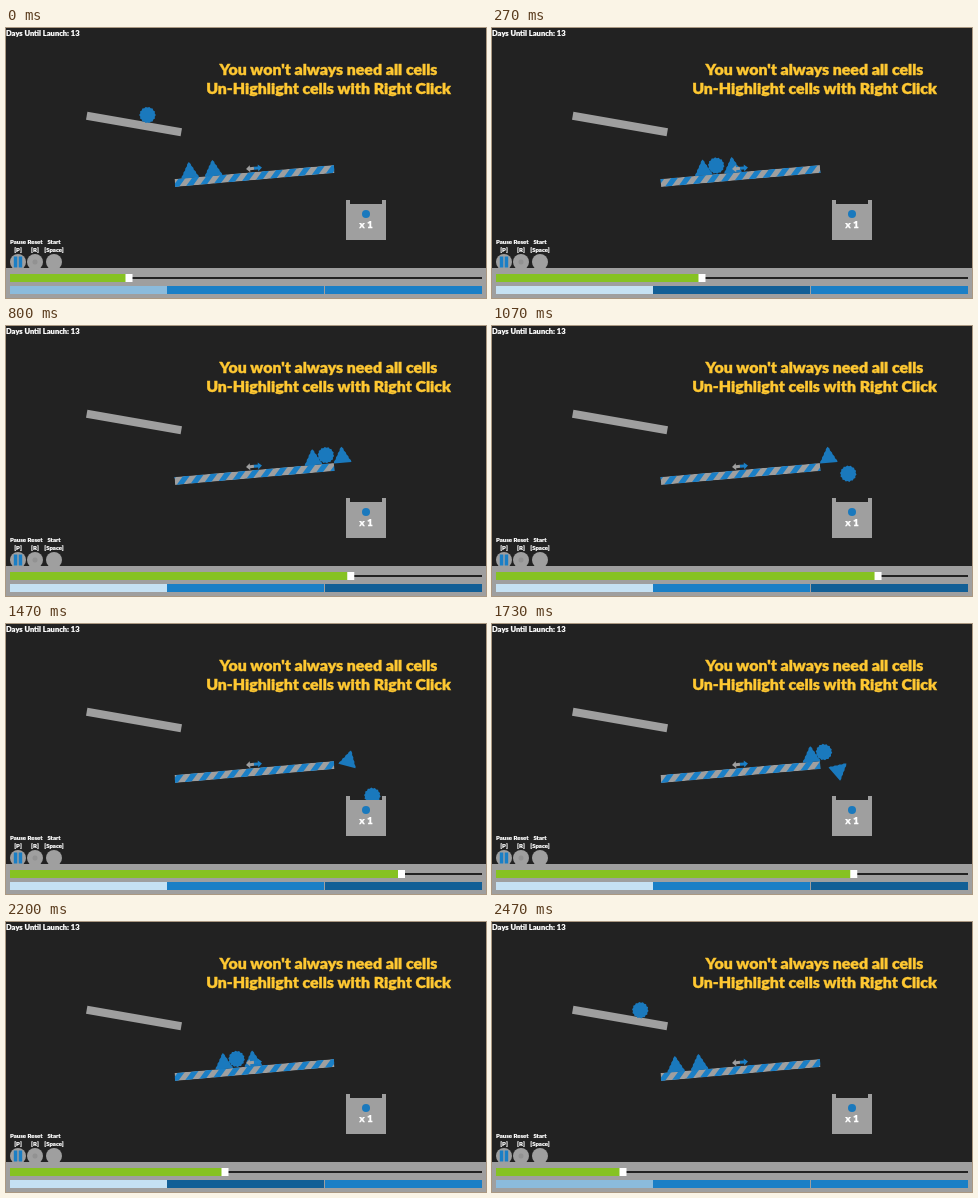
Animation, 480 px wide and 270 px high, one loop 2540 ms. Source, as an HTML page with a canvas:

```html
<!DOCTYPE html>
<html lang="en">
<head>
<meta charset="utf-8">
<title>Conveyor puzzle</title>
<style>
  html, body { margin: 0; width: 100%; height: 100%; overflow: hidden; background: #222; }
  canvas { display: block; width: 100%; height: 100%; }
</style>
</head>
<body>
<canvas id="stage" width="480" height="270"></canvas>
<script>
const ctx = document.getElementById('stage').getContext('2d');
const LOOP = 2540, STEP = 1000 / 15, TAU = Math.PI * 2;
const GRAY = '#9f9f9f', BLUE = '#1a7fc6', DARK_BLUE = '#125f96', BODY_BLUE = '#1a79bd';
const BACK = '#222222', YELLOW = '#ffc832';
const BELT_SLOPE = -.088, BELT_SPEED = .71, BELT_START = 161, BELT_EDGE = 335;
const RAMP_SLOPE = .172;

// The handle is dragged right with ease-out, rests, then is dragged back.
function handleAt(step) {
  const there = Math.min(1, step / 18), back = Math.max(0, (step - 24) / 13);
  return 395.5 - 272.5 * (1 - there) ** 1.53 - 264.5 * back ** 1.1;
}

const beltY = x => 136.6 + (x - 248.5) * BELT_SLOPE;

// Every pose is a function of the handle position s.
function spikePose(s, startX, startS) {
  const x = startX + BELT_SPEED * Math.max(0, s - startS);
  const over = Math.min(25, Math.max(0, x - BELT_EDGE));
  return [Math.min(x, BELT_EDGE + 25), beltY(x) + .1 * over ** 2, BELT_SLOPE + .0055 * over ** 2];
}

function ballPose(s) {
  const d = s - 123;
  const rampX = 141.5 + .8 * d + .0062 * d * d;
  const rampY = 87 + (rampX - 141.5) * RAMP_SLOPE + .12 * Math.max(0, d - 32) ** 2;
  const x = Math.min(rampX, 232 + BELT_SPEED * (s - 221));
  const over = Math.max(0, x - BELT_EDGE);
  const y = Math.min(rampY, beltY(x) - 1.2 + .105 * over ** 2);
  return [x + over / 2, y, Math.min(d, 51) / 8];
}

function rect(x, y, w, h, color) {
  ctx.fillStyle = color;
  ctx.fillRect(x, y, w, h);
}

function disc(x, y, r, color) {
  ctx.fillStyle = color;
  ctx.beginPath();
  ctx.arc(x, y, r, 0, TAU);
  ctx.fill();
}

function polygon(points, color) {
  ctx.fillStyle = color;
  ctx.beginPath();
  points.forEach(p => ctx.lineTo(...p));
  ctx.fill();
}

function text(str, x, y, size, color = '#fff', align = 'center') {
  ctx.font = `900 ${size}px Lato, sans-serif`;
  ctx.textAlign = align;
  ctx.fillStyle = ctx.strokeStyle = color;
  ctx.lineWidth = size / 40;
  ctx.fillText(str, x, y);
  ctx.strokeText(str, x, y);
}

function posed([x, y, angle], draw) {
  ctx.save();
  ctx.translate(x, y);
  ctx.rotate(angle);
  draw();
  ctx.restore();
}

const ballShape = Array.from({ length: 28 }, (_, i) => {
  const r = i % 2 ? 7.4 : 8.3, a = i / 28 * TAU;
  return [r * Math.cos(a), r * Math.sin(a)];
});

// Triangle with toothed sides
const side = Array.from({ length: 9 }, (_, i) => [i * 1.1 + (i % 2 ? .7 : 0), -8.3 + i * 2]);
const spikeShape = [...side, ...side.map(([x, y]) => [-x, y]).reverse()];

function drawBelt(travel) {
  posed([248.5, 148, BELT_SLOPE], () => {
    ctx.beginPath();
    ctx.rect(-80, -4, 160, 8);
    ctx.clip();
    rect(-80, -4, 160, 8, GRAY);
    for (let x = -111 + travel % 14; x < 90; x += 14)
      polygon([[x + 7, -4], [x + 14, -4], [x + 7, 4], [x, 4]], BLUE);
  });
}

function drawArrows() {
  const arrow = [[0, -1.5], [4, -1.5], [4, -3.5], [8, 0], [4, 3.5], [4, 1.5], [0, 1.5]];
  posed([248, 140.3, BELT_SLOPE], () => {
    polygon(arrow.map(([x, y]) => [-x, y]), GRAY);
    polygon(arrow, BLUE);
  });
}

function drawBin() {
  rect(340, 176, 40, 36, GRAY);
  rect(340, 172, 4, 5, GRAY);
  rect(376, 172, 4, 5, GRAY);
  disc(360, 186, 4, BODY_BLUE);
  text('x 1', 360, 199.5, 10);
}

function drawControls(s) {
  [['Pause', '[P]', 12], ['Reset', '[R]', 29], ['Start', '[Space]', 48]].forEach(([name, key, x]) => {
    text(name, x, 216, 6);
    text(key, x, 224, 6);
    disc(x, 234, 8, GRAY);
  });
  rect(7.8, 228.5, 3.5, 11, BLUE);
  rect(12.7, 228.5, 3.5, 11, BLUE);
  disc(29, 234, 2.5, '#929292');

  rect(0, 240, 480, 30, GRAY);
  rect(4, 249, 472, 2, BACK);
  rect(4, 246, s - 4, 8, '#86c222');
  rect(s - 3.5, 246, 7, 8, '#fff');
  const active = Math.floor((s - 4) / 157.5);
  for (let i = 0; i < 3; i++) {
    const idle = i ? BLUE : '#c5e1f3', lit = i ? DARK_BLUE : '#8bbbdc';
    rect(Math.floor(4 + i * 157.5), 258, 157, 8, i === active ? lit : idle);
  }
}

function render(now) {
  const step = Math.min(37, Math.floor((now % LOOP + 3.4) / STEP));
  const s = handleAt(step);
  rect(0, 0, 480, 270, BACK);
  text('Days Until Launch: 13', 0, 8, 7.5, '#fff', 'left');
  text("You won't always need all cells", 322.5, 47, 15.9, YELLOW);
  text('Un-Highlight cells with Right Click', 322.5, 66, 15.9, YELLOW);

  posed([128, 96, RAMP_SLOPE], () => rect(-48, -4, 96, 8, GRAY));
  drawBelt(Math.max(0, s - BELT_START) * BELT_SPEED);
  posed(spikePose(s, 183.5, 171), () => polygon(spikeShape, BODY_BLUE));
  posed(spikePose(s, 207, 163), () => polygon(spikeShape, BODY_BLUE));
  posed(ballPose(s), () => polygon(ballShape, BODY_BLUE));
  drawArrows();
  drawBin();
  drawControls(s);
}

function tick() {
  render(performance.now());
  requestAnimationFrame(tick);
}
tick();
</script>
</body>
</html>
```
